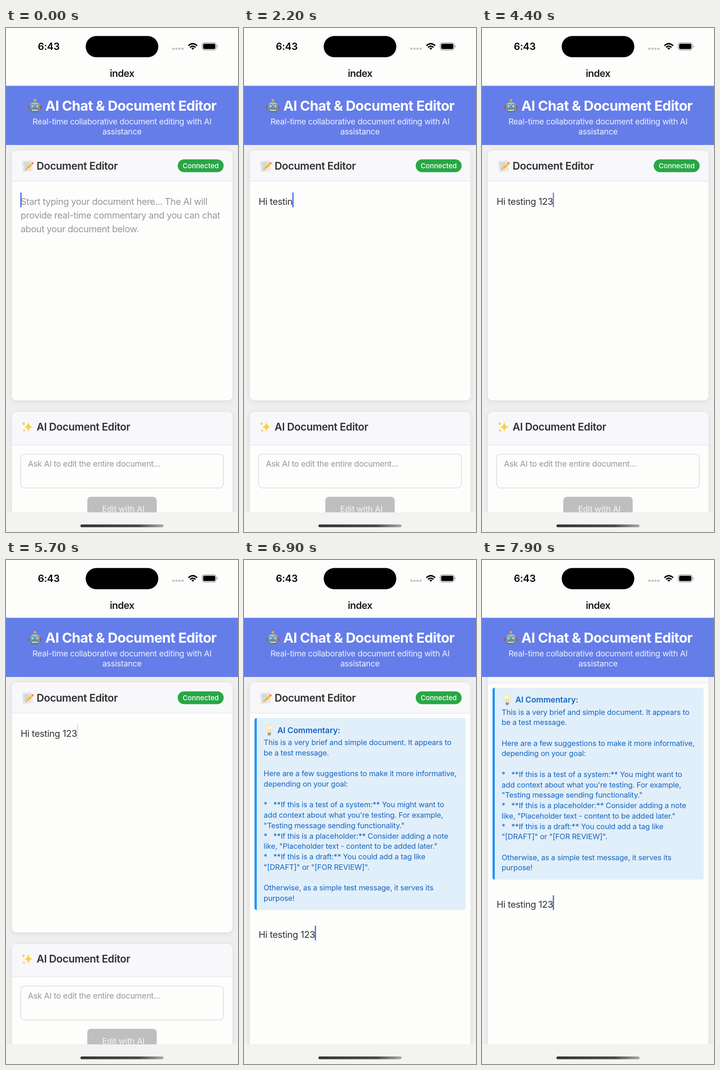
Recreate the animation shown at these times as an HTML page. Size 508x1103 px, loop 8000 ms.

```html
<!DOCTYPE html>
<html lang="en">
<head>
<meta charset="utf-8">
<title>Document editor</title>
<style>
  html, body { margin: 0; width: 100%; height: 100%; overflow: hidden; background: #fdfdfc; }
  svg { display: block; }
  #stage { width: 100vw; height: 100vh; }
  text { font-family: Inter, "Open Sans", sans-serif; white-space: pre; }
  .mid { text-anchor: middle; }
  .time { font-size: 21.5px; font-weight: 600; letter-spacing: -.01em; }
  .nav { font-size: 21.5px; font-weight: 600; letter-spacing: -.03em; fill: #1c1c1e; }
  .title { font-size: 30.3px; font-weight: 700; letter-spacing: -.0205em; fill: #fff; }
  .sub { font-size: 17.7px; letter-spacing: -.015em; fill: #fff; fill-opacity: .9; }
  .heading { font-size: 22.75px; font-weight: 600; letter-spacing: -.018em; fill: #303033; }
  .badge { font-size: 15.2px; font-weight: 500; letter-spacing: -.004em; fill: #fff; }
  .body { font-size: 20.2px; letter-spacing: -.024em; fill: #333; }
  #typed { letter-spacing: -.019em; }
  .hint { fill: #98989c; }
  .field { font-size: 17.7px; letter-spacing: -.014em; fill: #98989c; }
  .button { font-size: 17.7px; font-weight: 500; letter-spacing: -.008em; fill: #efefef; }
  .note { font-size: 16.4px; letter-spacing: -.011em; fill: #1565c0; }
  .note-head { font-size: 17.7px; font-weight: 600; letter-spacing: -.005em; fill: #1565c0; }
  .card { fill: #fdfdfc; filter: url(#shadow); }
</style>
</head>
<body>
<svg id="stage" viewBox="0 0 508 1103">
  <defs>
    <filter id="shadow" x="-10%" y="-10%" width="120%" height="120%">
      <feDropShadow dx="0" dy="2.5" stdDeviation="6" flood-opacity=".09"/>
    </filter>
    <clipPath id="view"><rect y="256" width="508" height="804"/></clipPath>
    <linearGradient id="bar">
      <stop offset="0" stop-color="#333"/><stop offset=".7" stop-color="#484848"/>
      <stop offset="1" stop-color="#aaa"/>
    </linearGradient>
    <linearGradient id="steel" x2="0" y2="1">
      <stop offset="0" stop-color="#a3cdd3"/><stop offset="1" stop-color="#4d808c"/>
    </linearGradient>
    <linearGradient id="pencil" x1="0" y1="1" x2="1" y2="0">
      <stop offset="0" stop-color="#f6a623"/><stop offset="1" stop-color="#ffcf3f"/>
    </linearGradient>
    <radialGradient id="glow">
      <stop offset="0" stop-color="#fffdec"/><stop offset="1" stop-color="#f8edbc"/>
    </radialGradient>
    <path id="spark" d="M0-1Q.1-.1 1 0Q.1.1 0 1Q-.1.1-1 0Q-.1-.1 0-1"/>
  </defs>

  <rect width="508" height="1103" fill="#f3f3f2"/>
  <rect y="256" width="508" height="804" fill="#efefef"/>

  <g clip-path="url(#view)">
    <g id="scroller">
      <rect id="editor" class="card" x="13" y="268.5" width="482.5" height="546.5" rx="10"/>
      <path d="M13 335V278.5a10 10 0 0 1 10-10H485.5a10 10 0 0 1 10 10V335z" fill="#f8f8fb"/>
      <path d="M13 335.2H495.5" stroke="#e4e5ea" stroke-width="1.3"/>
      <g transform="translate(35 290)">
        <path d="M1 2L20 .5 23 22 3 24.5z" fill="#e9e9e6" stroke="#c9c9c6" stroke-width=".6"/>
        <path d="M4 6l13-1M4 9.500l12-1M5 13l8-.6M5 16.500l5-.4M6 20l5-.4" stroke="#9a9da5" stroke-width=".8"/>
        <path d="M8 20.500L10 15 20.500 5 24 9 13.500 18.500z" fill="url(#pencil)"/>
        <path d="M8 20.500L10 15l3.500 3.500z" fill="#f1d4a2"/>
        <path d="M8 20.500l.8-2.200 1.300 1.400z" fill="#333"/>
        <path d="M20.500 5l1.600-1.500q1.500-.8 2.700.8t.4 3L24 9z" fill="#ec7b83"/>
      </g>
      <text class="heading" x="67" y="310">Document Editor</text>
      <rect x="376" y="287.500" width="100.500" height="28" rx="14" fill="#28a745"/>
      <text class="badge mid" x="426.300" y="307">Connected</text>

      <g id="commentary">
        <rect x="23" y="346" width="462.500" height="420" rx="5" fill="#e1effa"/>
        <path d="M28 346v420q-5 0-5-5V351q0-5 5-5" fill="#2196f3"/>
        <g transform="translate(55.300 361)">
          <path d="M-4 17C-4 13-8 12-8 7.500A8 7.500 0 0 1 8 7.500C8 12 4 13 4 17z" fill="url(#glow)" stroke="#e6d9a6" stroke-width=".6"/>
          <path d="M-1.500 17L-2.500 9 0 10.500 2.500 9 1.500 17" fill="none" stroke="#d9b24c" stroke-width=".8"/>
          <path d="M-3.700 17H3.700V21L1.500 23.500H-1.500L-3.700 21z" fill="#a9adb2"/>
          <path d="M-3.700 19H3.700M-3.500 21H3.500" stroke="#7b8086" stroke-width=".7"/>
        </g>
        <text class="note-head" x="73" y="378.500">AI Commentary:</text>
        <g id="note"></g>
      </g>

      <g id="entry">
        <g id="placeholder">
          <text class="body hint" x="32" y="386.500">Start typing your document here... The AI will</text>
          <text class="body hint" x="32" y="416.800">provide real-time commentary and you can chat</text>
          <text class="body hint" x="32" y="447.100">about your document below.</text>
        </g>
        <text id="typed" class="body" x="32" y="387"></text>
        <rect id="caret" y="360" width="2.600" height="32.500" rx="1.200" fill="#4065dd"/>
        <g id="bubble">
          <path d="M49 338H68a3 3 0 0 1 3 3V347a3 3 0 0 1-3 3H57L54.500 352.500 52 350H49a3 3 0 0 1-3-3V341a3 3 0 0 1 3-3" fill="#2b2b2d"/>
          <text class="mid" x="58.500" y="345.600" font-size="4.200" fill="#ddd">AutoFill</text>
        </g>
      </g>

      <g id="lower">
        <rect class="card" x="13" y="840" width="482.500" height="300" rx="10"/>
        <path d="M13 912V850a10 10 0 0 1 10-10H485.500a10 10 0 0 1 10 10V912z" fill="#f8f8fb"/>
        <path d="M13 912.300H495.500" stroke="#e4e5ea" stroke-width="1.300"/>
        <g fill="#fbcf4b">
          <use href="#spark" transform="translate(49 873) scale(9.500 11.500)"/>
          <use href="#spark" transform="translate(38.500 866) scale(4.500 5)"/>
          <use href="#spark" transform="translate(39.500 881) scale(4 4.500)"/>
        </g>
        <text class="heading" x="67" y="881">AI Document Editor</text>
        <rect x="32" y="932.700" width="444" height="74" rx="8" fill="#fdfdfc" stroke="#d8d8de" stroke-width="1.300"/>
        <text class="field" x="48" y="960">Ask AI to edit the entire document...</text>
        <rect x="178" y="1026" width="152" height="56" rx="8" fill="#bfbfbf"/>
        <text class="button mid" x="257" y="1058.500">Edit with AI</text>
      </g>
    </g>
  </g>

  <rect width="508" height="127" fill="#fdfdfc"/>
  <rect y="126.500" width="508" height="129.500" fill="#657de9"/>
  <text class="time mid" x="93.500" y="48">6:43</text>
  <rect x="174.500" y="17.500" width="159" height="46.500" rx="23.250"/>
  <g fill="#c6c6c8">
    <rect x="364" y="43" width="5" height="4.800" rx="1.500"/><rect x="370.700" y="43" width="5" height="4.800" rx="1.500"/>
    <rect x="377.300" y="43" width="5" height="4.800" rx="1.500"/><rect x="384" y="43" width="5" height="4.800" rx="1.500"/>
  </g>
  <g fill="none" stroke="#000" stroke-width="3">
    <path d="M399.500 38.800Q409 30 418.500 38.800M403 42.500Q409 37 415 42.500"/>
    <path d="M405.800 44.300Q409 41.800 412.200 44.300L409 47.700z" fill="#000" stroke="none"/>
  </g>
  <rect x="429.500" y="32.500" width="31" height="15.500" rx="5" fill="none" stroke="#949496" stroke-width="1.300"/>
  <rect x="431.600" y="34.600" width="26.800" height="11.300" rx="3.200"/>
  <path d="M462 37.700q2 .8 2 2.500t-2 2.500z" fill="#a4a4a6"/>
  <text class="nav mid" x="254" y="106.500">index</text>

  <g transform="translate(63.300 155)">
    <rect x="-1.200" y="4" width="2.400" height="5" fill="#8a6a50"/>
    <circle cy="3" r="2.600" fill="#f3b13c"/>
    <ellipse cx="-11.500" cy="18.500" rx="2.800" ry="4.500" fill="#b8473f"/>
    <ellipse cx="11.500" cy="18.500" rx="2.800" ry="4.500" fill="#b8473f"/>
    <path d="M-11.500 21Q-12 7.500 0 7.500T11.500 21L9.500 28.500q-9.500 3-19 0z" fill="url(#steel)"/>
    <g fill="#f1f8f8" stroke="#35535c" stroke-width="1.200">
      <circle cx="-5.300" cy="16" r="3.500"/><circle cx="5.300" cy="16" r="3.500"/>
    </g>
    <circle cx="-5.300" cy="16" r="1.500" fill="#3f9db5"/><circle cx="5.300" cy="16" r="1.500" fill="#3f9db5"/>
    <path d="M0 18l1.600 3h-3.200z" fill="#c9574c"/>
    <rect x="-7" y="22.700" width="14" height="4.600" rx="1.500" fill="#f4f4f2" stroke="#35535c"/>
    <path d="M-3.500 22.700v4.600M0 22.700v4.600M3.500 22.700v4.600" stroke="#35535c" stroke-width=".8"/>
  </g>
  <text class="title" x="86" y="181">AI Chat &amp; Document Editor</text>
  <text class="sub mid" x="254" y="211">Real-time collaborative document editing with AI</text>
  <text class="sub mid" x="254" y="232.700">assistance</text>
  <rect x="163" y="1086.500" width="182" height="6" rx="3" fill="url(#bar)"/>
</svg>
<script>
const LOOP = 8000;
const TICK = 100;
const MESSAGE = 'Hi testing 123';
const NOTE = `This is a very brief and simple document. It appears to
be a test message.

Here are a few suggestions to make it more informative,
depending on your goal:

*   **If this is a test of a system:** You might want to
add context about what you're testing. For example,
"Testing message sending functionality."
*   **If this is a placeholder:** Consider adding a note
like, "Placeholder text - content to be added later."
*   **If this is a draft:** You could add a tag like
"[DRAFT]" or "[FOR REVIEW]".

Otherwise, as a simple test message, it serves its
purpose!`;

// Both letters of "Hi" land together.
const KEY_TIMES = [1100, 1100, 1300, 1400, 1600, 1700, 1900, 2100, 2200, 2400, 2800, 3100, 3400, 3800];
const COMMENT_AT = 6900;
const COMMENT_SHIFT = 440;

const fadeOut = t => [[t, .8], [t + 100, 0]];
const fadeIn = t => [[t, .2], [t + 100, .55], [t + 200, 1]];
const CARET = [
  [0, 1], ...fadeOut(400), [700, .55], [800, 1],
  ...fadeOut(4400), ...fadeIn(4700),
  ...fadeOut(5400), ...fadeIn(5700),
  ...fadeOut(6400), ...fadeIn(6700),
  [7400, .8], [7500, .3], [7600, 0], [7800, .55], [7900, 1]
];
const SCROLL = [[0, 0], [7800, 30], [7900, 66.5]];

const $ = id => document.getElementById(id);
const valueAt = (track, t) => track.findLast(([start]) => start <= t)[1];
const show = (id, on) => $(id).setAttribute('visibility', on ? 'visible' : 'hidden');
const moveY = (id, y) => $(id).setAttribute('transform', `translate(0 ${y})`);

NOTE.split('\n').forEach((line, i) => {
  const row = document.createElementNS('http://www.w3.org/2000/svg', 'text');
  row.setAttribute('class', 'note');
  row.setAttribute('x', 43);
  row.setAttribute('y', 405 + i * 22.73);
  row.textContent = line;
  $('note').append(row);
});

function render(time) {
  const t = Math.floor(time % LOOP / TICK) * TICK;
  const count = KEY_TIMES.filter(k => k <= t).length;
  const commented = t >= COMMENT_AT;
  const shift = commented ? COMMENT_SHIFT : 0;

  $('typed').textContent = MESSAGE.slice(0, count);
  const width = count ? $('typed').getComputedTextLength() : 0;
  $('caret').setAttribute('x', 31.5 + width);
  $('caret').setAttribute('opacity', valueAt(CARET, t));
  show('placeholder', !count);
  show('bubble', t === KEY_TIMES[0]);
  show('commentary', commented);
  $('editor').setAttribute('height', 546.5 + shift);
  moveY('entry', shift);
  moveY('lower', shift);
  moveY('scroller', -valueAt(SCROLL, t));
}

function frame() {
  render(performance.now());
  requestAnimationFrame(frame);
}
frame();
</script>
</body>
</html>
```
